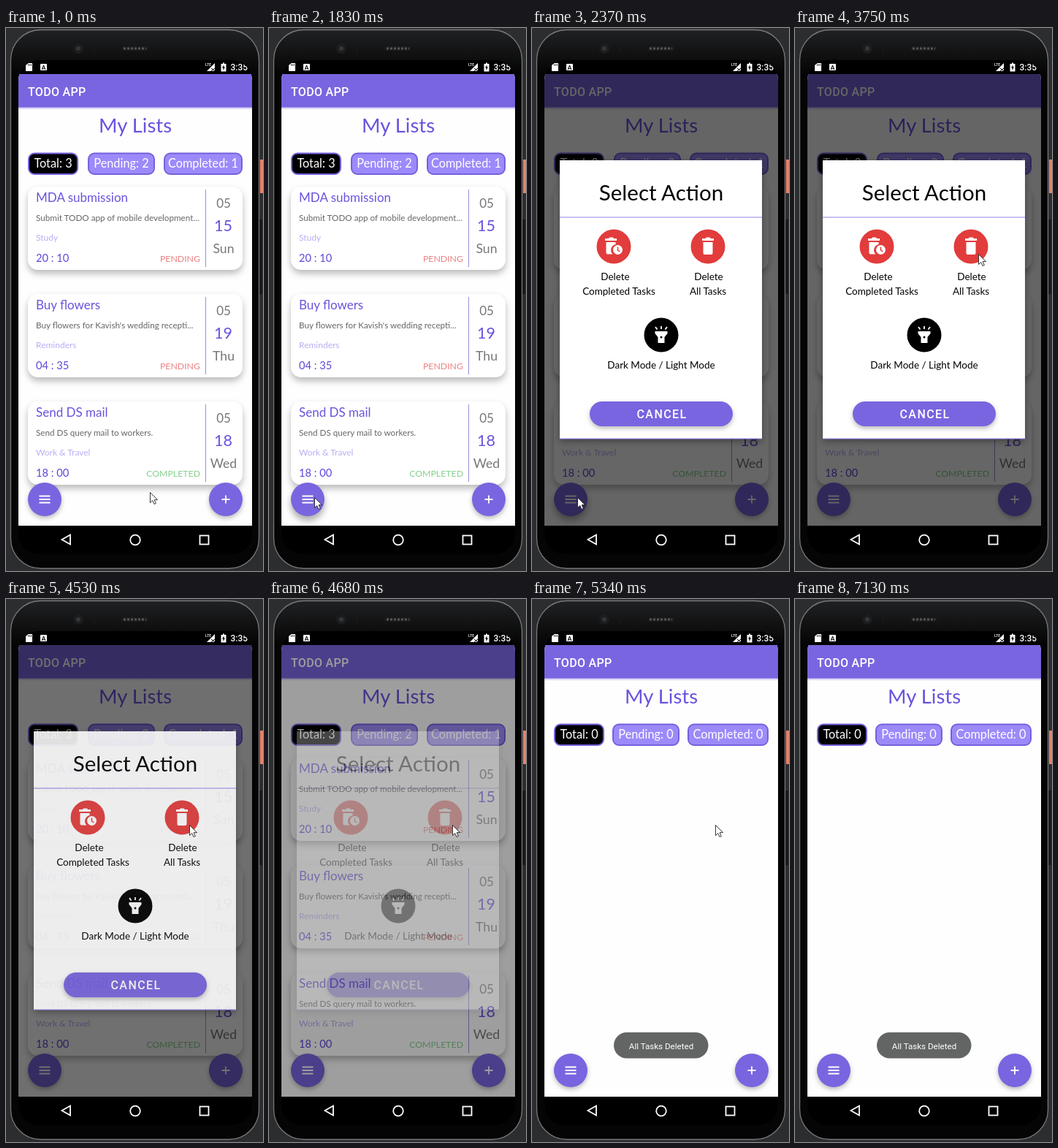
Write an HTML page that moves like this. It is 352x743 px and loops after 7.84 s.

```html
<!DOCTYPE html>
<html lang="en">
<head>
<meta charset="utf-8">
<title>Todo app</title>
<style>
  html, body { margin: 0; width: 100%; height: 100%; overflow: hidden; background: #2c2d2f; }
  svg { display: block; width: 352px; height: 743px; }
  text { font-family: Lato, sans-serif; }
  .ui { font-family: Roboto, sans-serif; font-weight: 500; fill: #fff; }
  .mid { text-anchor: middle; }
  .end { text-anchor: end; }
  .card { fill: #fff; filter: drop-shadow(0 5px 5px #0004); }
  .raised { filter: drop-shadow(0 3px 3px #0004); }
  .pressed { filter: drop-shadow(0 6px 5px #0005); }
  .line { fill: none; stroke: #fff; stroke-width: 1.8; }
</style>
</head>
<body>
<svg viewBox="0 0 352 743">
  <defs>
    <clipPath id="display"><rect x="17" y="44" width="320" height="676" rx="28"/></clipPath>
    <linearGradient id="barShadow" x2="0" y2="1">
      <stop stop-color="#7965e0" stop-opacity=".5"/>
      <stop offset="1" stop-color="#7965e0" stop-opacity="0"/>
    </linearGradient>
    <linearGradient id="bezel" x2="0" y2="1">
      <stop stop-color="#202123"/>
      <stop offset=".08" stop-color="#050505"/>
    </linearGradient>
  </defs>

  <!-- phone -->
  <rect x="348" y="180" width="6" height="46" fill="#e5836b"/>
  <rect x="347" y="262" width="4" height="102" fill="#18191a"/>
  <rect x="6.500" y="2.500" width="340" height="737" rx="41" fill="url(#bezel)" stroke="#77787a" stroke-width="1.300"/>
  <circle cx="99" cy="28" r="7" fill="#1c1d1e"/>
  <circle cx="99" cy="28" r="3" fill="#34363a"/>
  <rect x="119" y="22" width="3" height="12" rx="1.5" fill="#161718"/>
  <rect x="158" y="25" width="37" height="6" rx="3" fill="#1b1b1b"/>
  <path d="M161 28H192" stroke="#555" stroke-width="3" stroke-dasharray="3 2"/>

  <g clip-path="url(#display)">
    <rect x="17" y="44" width="320" height="676"/>
    <path d="M30 48h6v11h-9v-8z" fill="#fff"/>
    <path d="M30.500 49.500v2M32.500 49.500v2M34.500 49.500v2" stroke="#000"/>
    <rect x="47" y="49" width="9" height="9" rx="1" fill="#fff"/>
    <text x="51.500" y="56.500" class="mid" font-size="8" font-weight="700">A</text>
    <text x="273" y="52" class="ui" font-size="5">LTE</text>
    <path d="M286 48v11h-11z" fill="#fff"/>
    <path d="M281 55l5 4M286 55l-5 4" stroke="#000"/>
    <path d="M297 47.500h2v1.500h2.500v10.500h-7V49h2.500z" fill="#fff"/>
    <path d="M298.500 50.500l-2.500 4h1.500v3.500l2.500-4.500h-1.500z"/>
    <text x="307.500" y="58" class="ui" font-size="12">3:35</text>

    <rect x="17" y="63" width="320" height="618" fill="#fefefe"/>
    <rect x="17" y="108" width="320" height="4" fill="url(#barShadow)"/>
    <rect x="17" y="63" width="320" height="45.500" fill="#7965e0"/>
    <text x="30" y="92.500" class="ui" font-size="16" letter-spacing=".3">TODO APP</text>
    <text x="177" y="143" class="mid" font-size="27.500" fill="#6a53dd">My Lists</text>
    <g id="full"></g>
    <g id="empty"></g>
    <g fill="#7965e0">
      <circle id="menu" cx="53" cy="645" r="23"/><circle class="raised" cx="301" cy="645" r="23"/>
    </g>
    <path class="line" d="M45.500 640.500h15M45.500 645h15M45.500 649.500h15M295.500 645h11M301 639.500v11"/>

    <rect id="scrim" x="17" y="63" width="320" height="618"/>
    <g class="line">
      <path d="M76.500 700l11.500-6.500v13z"/>
      <circle cx="177" cy="700.500" r="6.800"/>
      <rect x="265.500" y="694.500" width="12" height="12"/>
    </g>
  </g>

  <g id="dialog">
    <rect x="38" y="181" width="277" height="381" fill="#fff" style="filter:drop-shadow(0 4px 5px #0005)"/>
    <path d="M38 259h277M38 562h277" stroke="#9080ee"/>
    <circle cx="112" cy="299" r="23.500" fill="#e23c3c"/>
    <circle cx="241" cy="299" r="23.500" fill="#e23c3c"/>
    <circle cx="177" cy="420" r="23.500"/>
    <g fill="#fff">
      <path d="M100 288h5l1-1.500h5l1 1.500h4v3h-16zM101.500 293h13v3a8 8 0 0 0-4 13.500h-7a2 2 0 0 1-2-2z"/>
      <circle cx="117.500" cy="303.500" r="6.500"/>
      <path d="M233 288h4.500l1.200-1.500h5l1.200 1.500h4.100v3h-16zM234.500 293h13v15a2 2 0 0 1-2 2h-9a2 2 0 0 1-2-2z"/>
      <path d="M168.500 415h17v3l-4 5v8h-9v-8l-4-5z"/>
    </g>
    <path d="M117.500 299.500v4.500l3 2" fill="none" stroke="#e23c3c" stroke-width="1.500"/>
    <path class="line" d="M177 408v4M169 409l2.500 3.500M185 409l-2.500 3.500"/>
    <circle cx="177" cy="423" r="1.500"/>
    <g class="mid">
      <text x="177" y="235.500" font-size="29.500">Select Action</text>
      <g font-size="13.500">
        <text x="114" y="345">Delete</text>
        <text x="119" y="365">Completed Tasks</text>
        <text x="242" y="345">Delete</text>
        <text x="241" y="365">All Tasks</text>
        <text x="177" y="466">Dark Mode / Light Mode</text>
      </g>
    </g>
    <rect class="raised" x="79" y="511" width="196" height="34" rx="17" fill="#7965e0"/>
    <text x="178" y="534" class="ui mid" font-size="16" letter-spacing="1.400">CANCEL</text>
  </g>

  <g id="toast">
    <rect x="112" y="593" width="129.500" height="35.500" rx="17.700" fill="#636565"/>
    <text x="177" y="615.500" class="ui mid" font-size="11.600" style="font-weight:400">All Tasks Deleted</text>
  </g>

  <path id="cursor" d="M.5.5V14.500L3.800 11.500 6 16.500 8.300 15.500 6.200 10.600H10.500z" fill="#fff" stroke="#222" stroke-width=".9"/>
</svg>

<script>
const LOOP = 7840;
const $ = id => document.getElementById(id);

const label = (x, y, size, fill, text, cls = '') =>
  `<text x="${x}" y="${y}" font-size="${size}" fill="${fill}" class="${cls}">${text}</text>`;

const chip = (x, width, text, fill = '#9d8afa') =>
  `<rect x="${x + 1}" y="171.500" width="${width - 2}" height="28.500" rx="8" fill="${fill}" stroke="#7661dd" stroke-width="2"/>` +
  label(x + width / 2, 190.5, 16.3, '#fff', text, 'mid');

const card = (y, title, note, tag, time, done, day, weekday) =>
  `<rect class="card" x="30" y="${y}" width="294" height="114" rx="14"/>
   <path d="M273.500 ${y + 4}v106" stroke="#9b8fd8"/>` +
  label(41, y + 21, 17, '#6a53dd', title) +
  label(41, y + 47, 11.7, '#666', note) +
  label(41, y + 74, 12, '#b9adf5', tag) +
  label(41, y + 103, 14.7, '#5f48d8', time) +
  label(266, y + 103, 12.3, done ? '#85d08c' : '#ee8080', done ? 'COMPLETED' : 'PENDING', 'end') +
  label(298, y + 29, 17, '#777', '05', 'mid') +
  label(297.5, y + 61, 21.5, '#6a53dd', day, 'mid') +
  label(298, y + 91, 17.7, '#777', weekday, 'mid');

$('full').innerHTML =
  chip(30, 69, 'Total: 3', '#000') + chip(112, 92, 'Pending: 2') + chip(216, 108, 'Completed: 1') +
  card(217, 'MDA submission', 'Submit TODO app of mobile development...', 'Study', '20 : 10', false, 15, 'Sun') +
  card(364, 'Buy flowers', "Buy flowers for Kavish's wedding recepti...", 'Reminders', '04 : 35', false, 19, 'Thu') +
  card(511, 'Send DS mail', 'Send DS query mail to workers.', 'Work &amp; Travel', '18 : 00', true, 18, 'Wed');
$('empty').innerHTML =
  chip(30, 69, 'Total: 0', '#000') + chip(110, 92, 'Pending: 0') + chip(213, 111, 'Completed: 0');

// Each key: [start time, ...values], held until the next one
const overlayKeys = [[0, 0, 0], [2250, .3, .5], [2370, .6, 1], [4530, .56, .88], [4680, .38, .27], [4810, 0, 0]];
const toastKeys = [[0, 0], [4960, .4], [5080, .75], [5200, 1]];
const cursorKeys = [
  [0, 197, 635], [770, 165, 648], [890, 112, 651], [1040, 75, 652], [1160, 66, 648], [1710, 63, 643], [1830, 62, 642]
];
for (let i = 1; i <= 7; i++) {
  const p = i / 7, ease = p * p * (3 - 2 * p);
  cursorKeys.push([2670 + 120 * i, 62 + 190 * ease, 642 - 329 * ease]);
}
cursorKeys.push([3630, 251, 310], [3750, 251, 309], [6440, 264, 314], [6590, 200, 470],
  [6710, 70, 643], [6860, 264, 573], [6980, 137, 611]);

const held = (keys, t) => keys.findLast(key => key[0] <= t).slice(1);
const show = (id, opacity) => $(id).setAttribute('opacity', opacity);

function draw(now) {
  const t = now % LOOP;
  const [scrim, dialog] = held(overlayKeys, t);
  show('scrim', scrim);
  show('dialog', dialog);
  show('toast', held(toastKeys, t)[0]);
  show('full', t < 4960 ? 1 : 0);
  show('empty', t < 4960 ? 0 : 1);
  show('cursor', t < 7130 ? 1 : 0);
  $('menu').setAttribute('class', t >= 1710 && t < 2500 ? 'pressed' : 'raised');
  $('cursor').setAttribute('transform', `translate(${held(cursorKeys, t)})`);
}

const start = performance.now();
(function tick() {
  draw(performance.now() - start);
  requestAnimationFrame(tick);
})();
</script>
</body>
</html>
```
